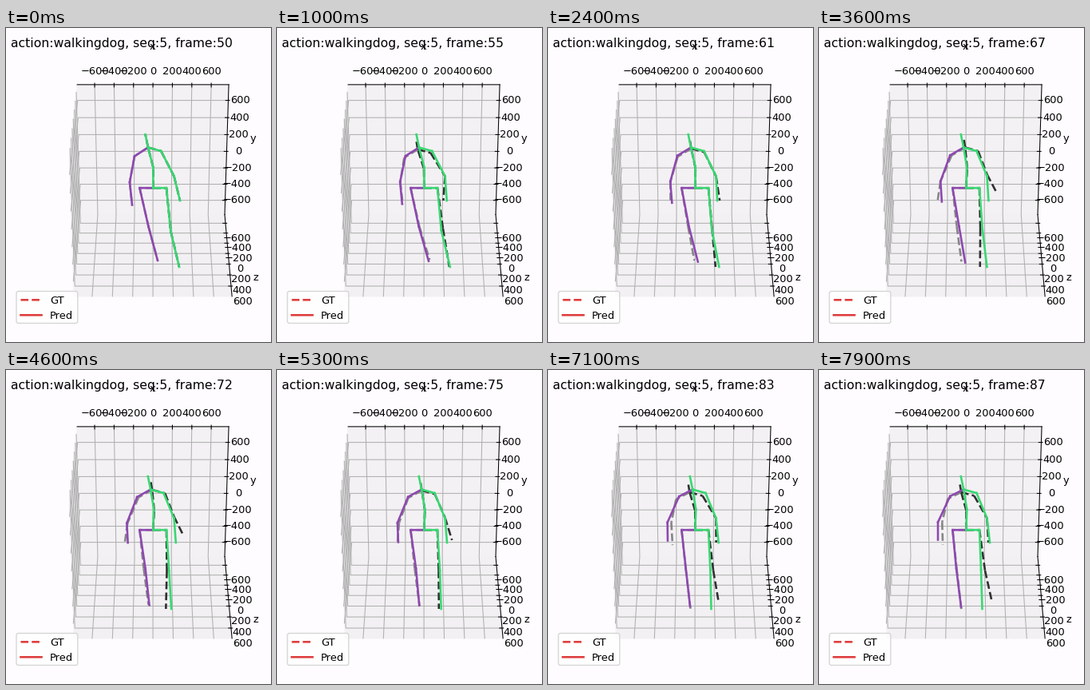
Write a matplotlib script that moves like this. It is 332 by 393 pixels and loops after 8000 ms.

```python
import numpy as np
import matplotlib.pyplot as plt
from matplotlib.animation import FuncAnimation
from matplotlib.patches import FancyBboxPatch, Polygon

W, H, DPI = 332, 393, 64
PT = 72 / DPI                      # points per pixel
FRAMES, STEP_MS = 80, 100
FIRST, LAST = 50, 87               # range of the frame counter
LIMIT = 780                        # data range of each axis
TICK_FONT, TITLE_FONT = 13.03, 15.6
RIGHT, LEFT, LEGEND = "#38d872", "#8e48b0", "#de3e3e"
GT_RIGHT, GT_LEFT = "#303030", "#868686"
BONE_W = 2.6

plt.rcParams["font.family"] = "DejaVu Sans"
fig = plt.figure(figsize=(W / DPI, H / DPI), dpi=DPI, facecolor="#fefcfe")
ax = fig.add_axes([0, 0, 1, 1])
ax.set_xlim(0, W)
ax.set_ylim(H, 0)
ax.axis("off")


def project(x, y, z):
    """Perspective view of the cube [-1, 1]^3, seen 30 degrees from above."""
    s, c = 0.5, np.sqrt(0.75)
    scale = 1688 / (17.41 - y * s - z * c)
    return 184.1 + scale * x, 200.6 - scale * (y * c - z * s)


def path(points, color, width, **kw):
    xs, ys = zip(*points)
    return ax.plot(xs, ys, color=color, lw=width * PT, snap=False, **kw)[0]


def label(x, y, text, size=TICK_FONT, ha="center", va="center", **kw):
    return ax.text(x, y, text, fontsize=size * PT, ha=ha, va=va, **kw)


def draw_box():
    panes = [
        ([(-1, 1, -1), (-1, 1, 1), (-1, -1, 1), (-1, -1, -1)], "#f6f4f6"),
        ([(-1, -1, -1), (1, -1, -1), (1, -1, 1), (-1, -1, 1)], "#f2f0f2"),
        ([(-1, 1, -1), (1, 1, -1), (1, -1, -1), (-1, -1, -1)], "#f3f1f3"),
    ]
    for corners, color in panes:
        ax.add_patch(Polygon([project(*p) for p in corners],
                             fc=color, ec=color, lw=PT))

    ticks = range(-600, 601, 200)
    for v in ticks:
        t = v / LIMIT
        for line in ([(t, 1, -1), (t, -1, -1), (t, -1, 1)],
                     [(1, t, -1), (-1, t, -1), (-1, t, 1)],
                     [(1, -1, t), (-1, -1, t), (-1, 1, t)]):
            path([project(*p) for p in line], "#b0b0b0", 1.04)

    for a, b in ([(-1, 1, -1), (1, 1, -1)], [(1, 1, -1), (1, -1, -1)],
                 [(1, -1, -1), (1, -1, 1)]):
        path([project(*a), project(*b)], "black", 1.04)

    for v in ticks:
        t, text = v / LIMIT, str(v).replace("-", "\u2212")
        x, y = project(t, 1, -1)
        path([(x, y - 1.8), (x, y + 3)], "black", 1.04)
        label(x, 54.3, text)
        for p, dy in (((1, t, -1), 0), ((1, -1, t), 19.3)):
            x, y = project(*p)
            path([(x - 3.2, y), (x + 1.7, y)], "black", 1.04)
            label(x + 14.6, y + dy, text)

    for x, y, name in ((184, 27, "x"), (309.8, 142, "y"), (313, 315.5, "z")):
        label(x, y, name, va="baseline")


def draw_legend():
    ax.add_patch(FancyBboxPatch((13, 329.5), 76.8, 40,
                                boxstyle="round,pad=0,rounding_size=2.6",
                                fc=(1, 1, 1, 0.8), ec="#d4d4d4",
                                lw=1.3 * PT, zorder=6))
    for y, name, style in ((340.3, "GT", "--"), (359.3, "Pred", "-")):
        path([(18.5, y), (44.5, y)], LEGEND, BONE_W, ls=style, zorder=7)
        label(54.8, y + 4.6, name, ha="left", va="baseline", zorder=7)


def ease(n, start, end):
    u = np.clip((n - start) / (end - start), 0, 1)
    return u * u * (3 - 2 * u)


def body(k, neck, lift, **limbs):
    """All joints in pixels; k is the progress of the walk from 0 to 1."""
    nx, ny = neck
    wrist_drop = limbs["wrist_r"][1] - 216
    joints = dict(
        pelvis=(184.3, 200.2), hip_r=(201, 200.2), hip_l=(167.4, 200.2),
        spine=(184.7 + 0.25 * (nx - 179), 174.5 + 0.5 * lift),
        neck=neck, head=(nx - 3.4 + 0.4 * lift, ny - 16.3 + lift),
        shoulder_r=(nx + 16.2, ny + 4.5),
        elbow_r=(210.5, 185.5 + 0.25 * wrist_drop),
        shoulder_l=(nx - 17, ny + 11 - 2.5 * k), **limbs)
    return {name: np.array(p) for name, p in joints.items()}


def predicted(n):
    k = (n - FIRST) / (LAST - FIRST)
    return body(
        k, neck=(178 + 3.2 * ease(n, 57, 67), 149.5), lift=0,
        wrist_r=(211 + 3 * k + 7 * np.exp((FIRST - n) / 3), 216),
        elbow_l=(155 - 6 * k, 193 - 2.5 * k),
        wrist_l=(158 - 9 * k, 221.5 - 9 * k),
        knee_l=(178.5 - 6.5 * k, 248.5),
        ankle_l=(190 - 12 * ease(n, 55, 77), 291 + 5.5 * k),
        knee_r=(206.3 - 3.3 * k, 254 - 4 * k),
        ankle_r=(217 - 12.5 * ease(n, 53, 80), 299))


def truth(n):
    """Swinging walk that parts from the prediction in the first frames."""
    k = (n - FIRST) / (LAST - FIRST)
    arm = -np.cos(2 * np.pi * (n - 54) / 30)
    leg = np.cos(2 * np.pi * (n - 54) / 33)
    walk = body(
        k, neck=(179.4 + 3.4 * arm + 1.5 * k, 150.2 - 1.5 * arm + 1.5 * k),
        lift=3,
        wrist_r=(215 + 7.2 * arm + 3 * k, 216 - 10 * max(0, arm)),
        elbow_l=(153.3 - 1.2 * arm, 193 - 2.5 * k),
        wrist_l=(153.6 - 4.3 * arm - 2 * k, 218.5 - 2.5 * arm - 2 * k),
        knee_l=(178.5 - 6 * ease(n, 54, 68), 248.5),
        ankle_l=(191.5 - 13 * ease(n, 54, 66), 290 + 11 * k * k),
        knee_r=(204.7 + 3.3 * leg, 251),
        ankle_r=(208 + 8 * leg, 299 - 12 * ease(n, 76, 87)))
    blend = ease(n, FIRST, FIRST + 4)
    return {name: p + blend * (walk[name] - p)
            for name, p in predicted(n).items()}


CHAINS = ["pelvis hip_l knee_l ankle_l", "neck shoulder_l elbow_l wrist_l",
          "pelvis hip_r knee_r ankle_r", "pelvis spine neck head",
          "neck shoulder_r elbow_r wrist_r"]
BONES = [bone for chain in map(str.split, CHAINS)
         for bone in zip(chain, chain[1:])]


def skeleton(right, left, style, z):
    return [path([(0, 0), (0, 0)], left if b.endswith("_l") else right,
                 BONE_W, ls=style, zorder=z) for _, b in BONES]


draw_box()
draw_legend()
bodies = [(truth, skeleton(GT_RIGHT, GT_LEFT, "--", 3)),
          (predicted, skeleton(RIGHT, LEFT, "-", 4))]
title = label(5.9, 24.3, "", TITLE_FONT, ha="left", va="baseline")


def update(i):
    n = int(FIRST + 0.5 + 0.47 * i)
    title.set_text(f"action:walkingdog, seq:5, frame:{n}")
    for pose, lines in bodies:
        joints = pose(n)
        for line, (a, b) in zip(lines, BONES):
            line.set_data(*zip(joints[a], joints[b]))
    return [title]


anim = FuncAnimation(fig, update, frames=FRAMES, interval=STEP_MS,
                     repeat=True, repeat_delay=0)
plt.show()
```
